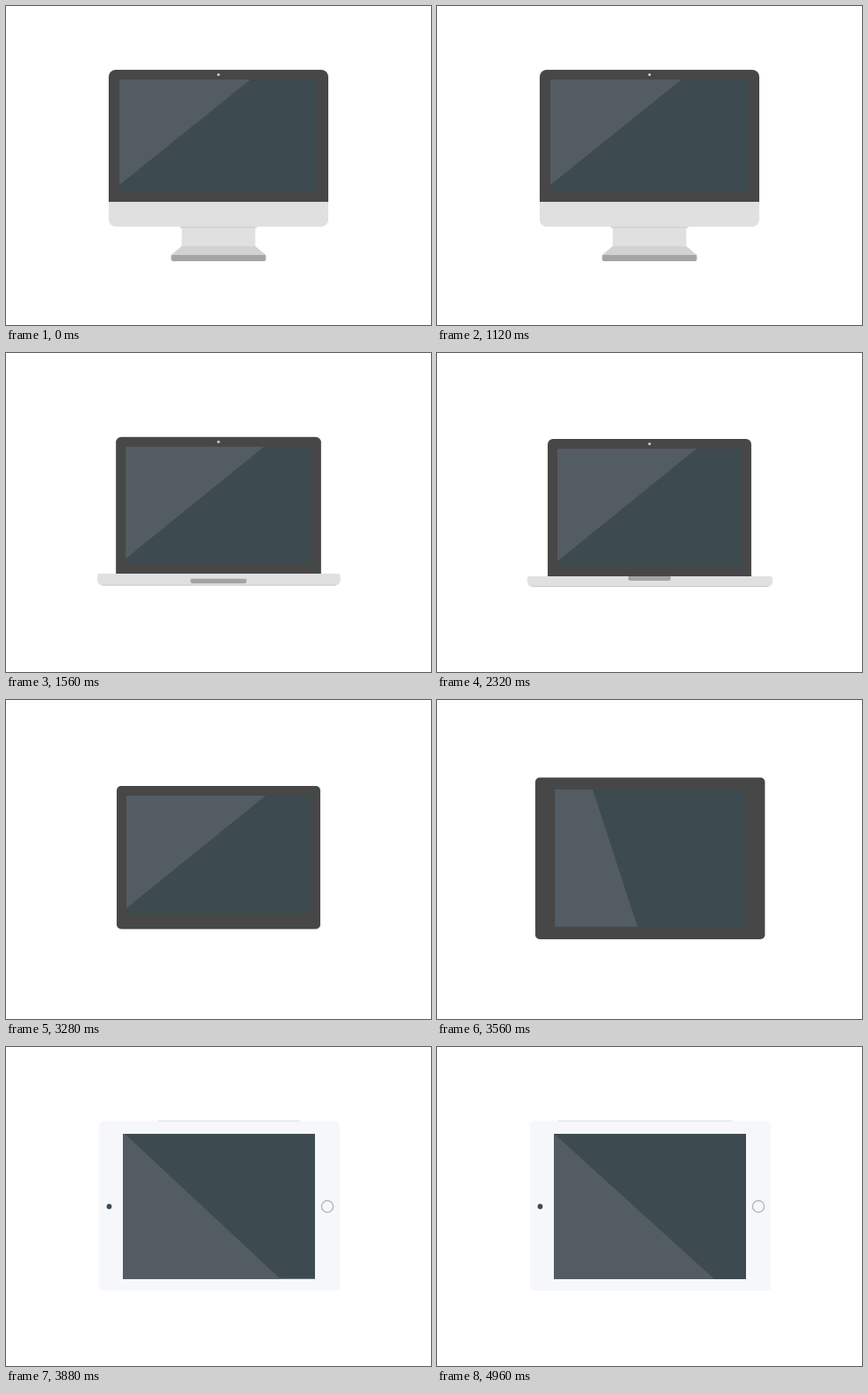
Write an HTML page with a canvas that moves like this. It is 480x360 px and loops after 5 s.

```html
<!DOCTYPE html>
<html lang="en">
<head>
<meta charset="utf-8">
<title>Devices</title>
<style>
  html, body { margin: 0; width: 100%; height: 100%; overflow: hidden; background: #fff; }
  canvas { display: block; width: 480px; height: 360px; }
</style>
</head>
<body>
<canvas id="stage" width="480" height="360"></canvas>
<script>
const ctx = document.getElementById('stage').getContext('2d');
const LOOP = 5000, STEP = 40;

// Boxes are [left, top, right, bottom].
const desktop = { body: [116, 72, 364, 221], screen: [128, 83, 352, 210], base: [116, 221, 364, 249],
  radius: [8, 0], pivot: [204, 140.9], angle: [Math.atan2(119, -148)] };
const laptop = { body: [125, 97, 355, 252], screen: [136, 108, 344, 241], base: [102, 252, 379, 264],
  radius: [6, 0], pivot: [214, 172], angle: [Math.atan2(127, -157)] };
const slab = { ...laptop, body: [125, 97, 355, 258.5], base: [125, 250, 355, 258], radius: [5, 5] };
const tablet = { ...slab, body: [105, 83.5, 377, 275], screen: [132, 98, 349, 262],
  pivot: [214, 172], angle: [Math.atan2(164, 181)] };

const clamp = v => Math.min(1, Math.max(0, v));
const lerp = (a, b, p) => a + (b - a) * p;
const span = (t, start, length) => clamp((t - start) / length);

// Standard "ease" curve: cubic-bezier(.25, .1, .25, 1).
function ease(x) {
  const curve = (a, b, s) => 3 * a * s * (1 - s) ** 2 + 3 * b * s * s * (1 - s) + s ** 3;
  let lo = 0, hi = 1;
  for (let i = 0; i < 24; i++) {
    const mid = (lo + hi) / 2;
    if (curve(0.25, 0.25, mid) < x) lo = mid; else hi = mid;
  }
  return x <= 0 ? 0 : x >= 1 ? 1 : curve(0.1, 1, lo);
}

function blend(from, to, p) {
  const pose = {};
  for (const key in from) pose[key] = from[key].map((v, i) => lerp(v, to[key][i], p));
  return pose;
}

function box([l, t, r, b], fill, radii = 0) {
  ctx.beginPath();
  ctx.roundRect(l, t, r - l, b - t, radii);
  ctx.fillStyle = fill;
  ctx.fill();
}

function dot(x, y, r, fill) {
  ctx.beginPath();
  ctx.arc(x, y, r, 0, Math.PI * 2);
  ctx.fillStyle = fill;
  ctx.fill();
}

function polygon(points, fill) {
  ctx.beginPath();
  points.forEach(([x, y]) => ctx.lineTo(x, y));
  ctx.closePath();
  ctx.fillStyle = fill;
  ctx.fill();
}

function drawNeck(top, footTop, footHalf) {
  const half = Math.min(41.5, footHalf), flare = footTop - 10;
  if (footTop <= top) return;
  box([240 - half, top - 6, 240 + half, flare + 1], '#e0e0e0');
  polygon([[240 - half, flare], [240 + half, flare], [240 + footHalf, footTop], [240 - footHalf, footTop]], '#d2d2d2');
  box([240 - half - 2, top, 240 + half + 2, top + 1.5], '#d2d2d2');
}

function drawScreen(screen, [x, y], angle) {
  box(screen, '#3d4a4f');
  const [l, t, r, b] = screen;
  const dx = Math.cos(angle) * 500, dy = Math.sin(angle) * 500;
  ctx.save();
  ctx.beginPath();
  ctx.rect(l, t, r - l, b - t);
  ctx.clip();
  polygon([[x - dx, y - dy], [x + dx, y + dy], [x + dx - dy, y + dy + dx], [x - dx - dy, y - dy + dx]], '#545c63');
  ctx.restore();
}

function draw(t) {
  const fold = ease(span(t, 1130, 680));
  const detach = ease(span(t, 2920, 360));
  const grow = ease(span(t, 3280, 680));
  const white = span(t, 3600, 200);

  const pose = grow > 0 ? blend(slab, tablet, grow)
    : detach > 0 ? blend(laptop, slab, detach)
    : blend(desktop, laptop, fold);
  const { body, screen, base, radius, pivot, angle } = pose;

  ctx.fillStyle = '#fff';
  ctx.fillRect(0, 0, 480, 360);

  // Stand and base; the foot ends up as the notch of the laptop.
  if (detach < 1) {
    const footHalf = lerp(53.5, 24, fold ** 3);
    const footTop = lerp(281, 252, fold), footBottom = lerp(288, 257, fold);
    ctx.globalAlpha = 1 - detach;
    drawNeck(base[3], footTop, footHalf);
    const top = 3 * fold, bottom = lerp(8, 6, fold);
    box(base, '#e0e0e0', [top, top, bottom, bottom]);
    if (fold > 0.9) box([base[0] + 5, base[3] - 1, base[2] - 5, base[3]], '#cccccc');
    box([240 - footHalf, footTop, 240 + footHalf, footBottom], '#a4a4a4', [1, 1, 2.5, 2.5]);
    ctx.globalAlpha = 1;
  }

  const mix = (a, b) => Math.round(lerp(a, b, white));
  box(body, `rgb(${mix(71, 245)},${mix(71, 247)},${mix(71, 250)})`, [radius[0], radius[0], radius[1], radius[1]]);
  drawScreen(screen, [pivot[0] - 18.5 * Math.sin(Math.PI * grow), pivot[1]], angle[0]);

  if (detach < 1) {
    ctx.globalAlpha = 1 - detach;
    dot(240, body[1] + 5.5, 1.5, '#cfd4d6');
  }
  if (white > 0) {
    ctx.globalAlpha = white;
    dot(116.5, 180, 2.9, '#3d4a4f');
    ctx.beginPath();
    ctx.arc(363, 180, 6.6, 0, Math.PI * 2);
    ctx.lineWidth = 1.2;
    ctx.strokeStyle = '#a9b0b4';
    ctx.stroke();
  }
  ctx.globalAlpha = 1;
  if (t >= 3840) box(t < 4120 ? [172, 83, 332, 84] : [137, 83, 334, 84], '#dde2e5');
}

const begin = performance.now();
function tick() {
  const t = (performance.now() - begin) % LOOP;
  draw(Math.floor(t / STEP) * STEP);
  requestAnimationFrame(tick);
}
tick();
</script>
</body>
</html>
```
